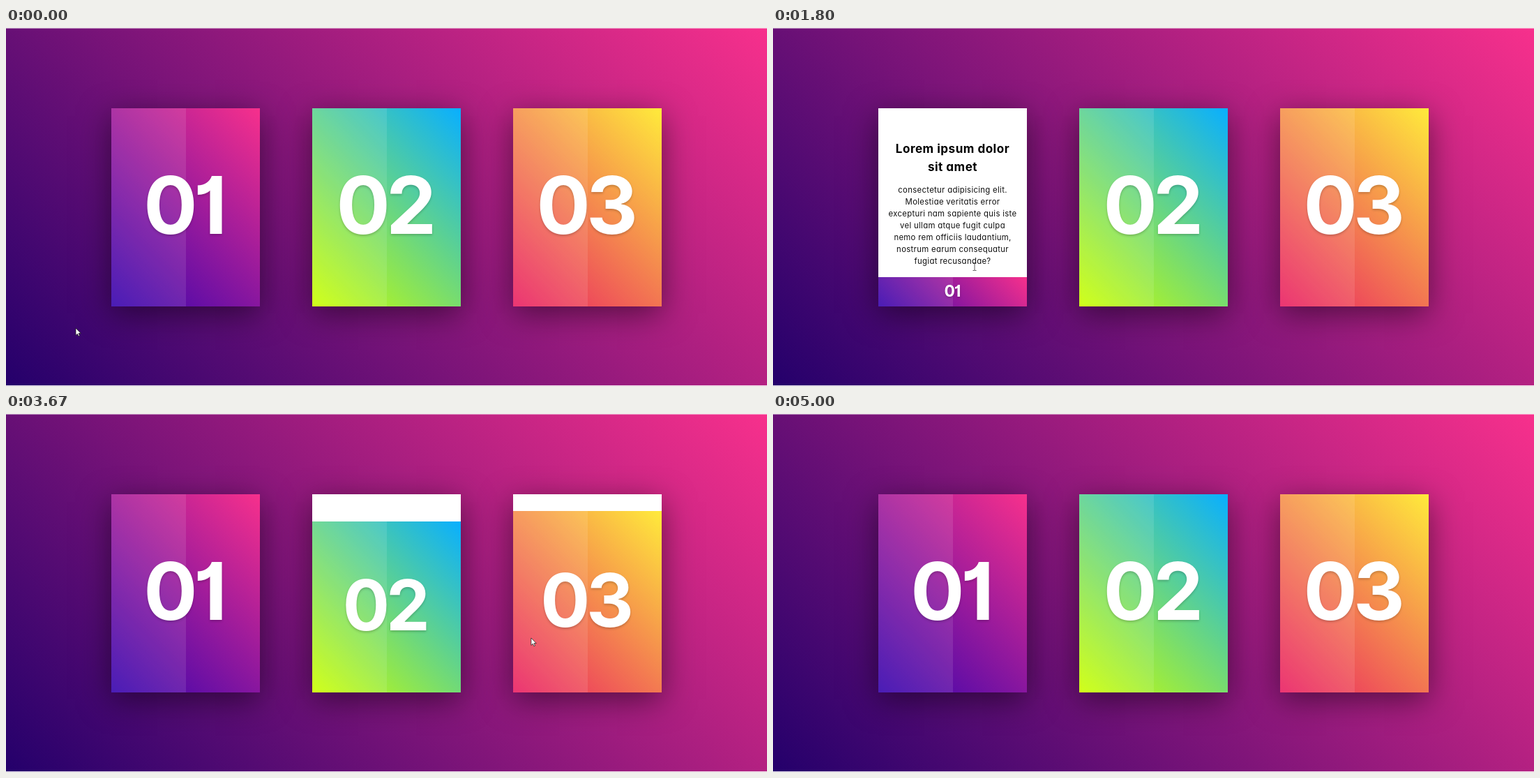
An HTML page that plays this animation: 1091x513 px, repeating every 5540 ms.

```html
<!DOCTYPE html>
<html lang="en">
<head>
<meta charset="utf-8">
<title>Hover cards</title>
<style>
  html, body { margin: 0; width: 100%; height: 100%; overflow: hidden; }
  body {
    position: relative;
    background: linear-gradient(45deg, #24006b, #f7308c);
    font-family: Inter, Roboto, sans-serif;
    font-feature-settings: "cv01", "cv11";
  }
  .edge { position: absolute; left: 0; right: 0; height: 1px; background: #fff; }
  .edge.top { top: 0; opacity: .5; }
  .edge.bottom { bottom: 0; opacity: .85; }
  .card {
    --p: 0;
    position: absolute; top: 115px; width: 213px; height: 284.4px;
    background: #fff;
    box-shadow: 0 10.7px 42.7px rgba(0, 0, 0, .5);
    text-align: center;
  }
  .card h2, .card p { position: absolute; left: 0; width: 100%; margin: 0; white-space: pre; }
  .card h2 { top: 45px; font-size: 17.07px; font-weight: 700; line-height: 25.6px; letter-spacing: .5px; }
  .card p { top: 108.7px; font-size: 11.38px; line-height: 17.07px; letter-spacing: .3px; color: #111; }
  .cover {
    position: absolute; left: 0; bottom: 0; width: 100%; overflow: hidden;
    height: calc(284.4px - 241.8px * var(--p));
    display: flex; align-items: center; justify-content: center;
  }
  .cover::after {
    content: ""; position: absolute; left: 0; top: 0; width: 50%; height: 100%;
    background: rgba(255, 255, 255, .1);
  }
  .num {
    position: relative; z-index: 1; top: -.024em; padding-right: .055em;
    font-size: calc(114.5px - 91.6px * var(--p));
    font-weight: 750; line-height: 1; letter-spacing: -.05em;
    color: #fff; text-shadow: 0 1.5px 3.5px rgba(0, 0, 0, .2);
  }
  #cursor { position: absolute; left: 0; top: 0; overflow: visible; }
</style>
</head>
<body>
<div class="edge top"></div>
<div class="edge bottom"></div>
<svg id="cursor" width="1" height="1">
  <path id="arrow" d="M0 0V10.4L2.4 8.2 4 11.7 5.6 11 4.1 7.6H7.3Z" fill="#fff" stroke="#111" stroke-width=".7"/>
  <path id="beam" d="M-2.5 -5.5H-.7L0 -5 .7 -5.5H2.5M0 -5V5M-2.5 5.5H-.7L0 5 .7 5.5H2.5" fill="none" stroke="#333" stroke-width=".8"/>
</svg>
<script>
const LOOP = 5540, FPS = 15, FADE = 500, EXIT = 5000;
const WIDTH = 213, TEXT_TOP = 224, TEXT_END = 343;
const title = "Lorem ipsum dolor\nsit amet";
const copy = [
  "consectetur adipisicing elit.", "Molestiae veritatis error",
  "excepturi nam sapiente quis iste", "vel ullam atque fugit culpa",
  "nemo rem officiis laudantium,", "nostrum earum consequatur", "fugiat recusandae?"
].join("\n");

// open and close: when the pointer enters and leaves, in ms
const cards = [
  { from: "#3503ad", to: "#f7308c", open: 166, close: 1983 },
  { from: "#ccff00", to: "#09afff", open: 2200, close: 3397 },
  { from: "#e91e63", to: "#ffeb3b", open: 3615, close: 4380 }
];

// pointer stops: [ms, x, y]
const stops = [
  [0, 100, 430], [400, 203, 359], [667, 249, 349], [1000, 249, 349],
  [1330, 225, 376], [1470, 225, 376], [1530, 249, 349], [1800, 289, 342],
  [2130, 425, 326], [2733, 531, 317], [2870, 531, 317], [3133, 596, 317],
  [3250, 596, 317], [3667, 753, 321], [4067, 814, 325], [4380, 800, 399],
  [4800, 115, 490], [EXIT, 78, 520]
];

const arrow = document.getElementById("arrow");
const beam = document.getElementById("beam");
const cursor = document.getElementById("cursor");

cards.forEach((c, i) => {
  c.x = 151 + 288 * i;
  c.el = document.createElement("div");
  c.el.className = "card";
  c.el.style.left = c.x + "px";
  c.el.innerHTML = `<h2>${title}</h2><p>${copy}</p>
    <div class="cover" style="background:linear-gradient(45deg,${c.from},${c.to})"><span class="num">0${i + 1}</span></div>`;
  document.body.insertBefore(c.el, cursor);
});

// the CSS "ease" curve: cubic-bezier(.25, .1, .25, 1)
function ease(x) {
  if (x <= 0) return 0;
  if (x >= 1) return 1;
  const curve = (s, a, b) => 3 * (1 - s) * (1 - s) * s * a + 3 * (1 - s) * s * s * b + s * s * s;
  let lo = 0, hi = 1;
  for (let i = 0; i < 20; i++) {
    const mid = (lo + hi) / 2;
    if (curve(mid, .25, .25) < x) lo = mid; else hi = mid;
  }
  return curve(lo, .1, 1);
}

function pointAt(t) {
  const i = stops.findIndex(s => s[0] > t);
  if (i < 0) return stops[stops.length - 1].slice(1);
  const [t0, x0, y0] = stops[i - 1], [t1, x1, y1] = stops[i];
  const f = (t - t0) / (t1 - t0);
  return [x0 + (x1 - x0) * f, y0 + (y1 - y0) * f];
}

function draw(ms) {
  // the picture moves in steps of 1/15 s
  const t = Math.floor((ms + 4) * FPS / 1000) * 1000 / FPS;
  const [x, y] = pointAt(t);
  let overText = false;
  for (const c of cards) {
    const p = ease((t - c.open) / FADE) - ease((t - c.close) / FADE);
    c.el.style.setProperty("--p", p);
    if (p === 1 && x > c.x && x < c.x + WIDTH && y > TEXT_TOP && y < TEXT_END) overText = true;
  }
  cursor.style.transform = `translate(${x}px, ${y}px)`;
  cursor.style.visibility = t < EXIT ? "visible" : "hidden";
  arrow.style.display = overText ? "none" : "";
  beam.style.display = overText ? "" : "none";
}

const start = performance.now();
function tick() {
  draw((performance.now() - start) % LOOP);
  requestAnimationFrame(tick);
}
tick();
</script>
</body>
</html>
```
